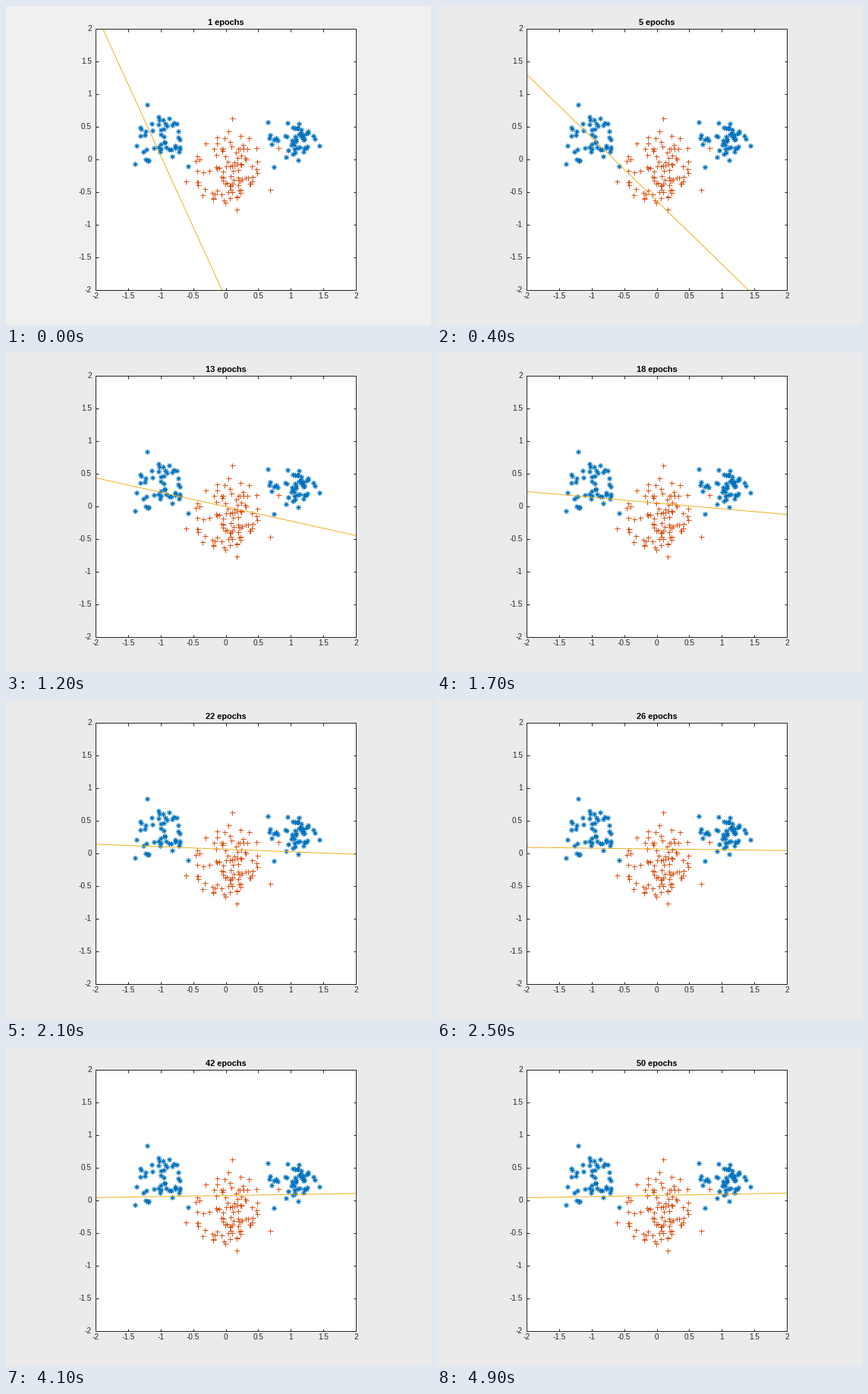
Write a matplotlib script that moves like this. It is 560x420 px and loops after 5000 ms.

```python
import matplotlib.pyplot as plt
import numpy as np
from matplotlib.animation import FuncAnimation

W, H, DPI = 560, 420, 100
PX = 72 / DPI  # points per pixel
LEFT, TOP, WIDE, HIGH = 118, 30, 343, 344
EPOCHS = 50
INK = "#262626"

plt.rcParams["font.family"] = "Liberation Sans"
rng = np.random.default_rng(12)


def cloud(count, cx, cy, rx, ry, tilt=0):
    """Random points in an ellipse, a little denser towards its centre."""
    angle = rng.uniform(0, 2 * np.pi, count)
    radius = rng.uniform(0, 1, count) ** 0.6
    dx = rx * radius * np.cos(angle)
    dy = ry * radius * np.sin(angle)
    return np.column_stack([cx + dx, cy + dy + tilt * dx])


# Each class is its clouds plus a few stragglers.
blue = np.vstack([cloud(47, -1.02, .30, .37, .38),
                  cloud(47, 1.03, .30, .36, .32),
                  [(-1.21, .84), (-.58, -.10), (-1.39, -.07),
                   (.65, .57), (.74, -.12), (1.44, .21)]])
orange = np.vstack([cloud(95, 0, -.12, .53, .55, tilt=.25),
                    [(.10, .63), (.81, .17), (.68, -.46),
                     (.17, -.77), (-.61, -.34)]])


def left_end(step):
    return 0.04 + 2.203 * np.exp(-0.137 * step * (1 + 0.0034 * step))


def right_end(step):
    return 0.117 - 6.61 * np.exp(-0.236 * step / (1 + 0.0124 * step))


fig = plt.figure(figsize=(W / DPI, H / DPI), dpi=DPI)
ax = fig.add_axes([LEFT / W, 1 - (TOP + HIGH) / H, WIDE / W, HIGH / H])
ax.set(xlim=(-2, 2), ylim=(-2, 2))
ticks = np.arange(-2, 2.1, 0.5)
ax.set_xticks(ticks)
ax.set_yticks(ticks)
ax.tick_params(direction="in", length=3.5 * PX, width=PX, color=INK,
               top=True, right=True, labelbottom=False, labelleft=False)
for spine in ax.spines.values():
    spine.set(linewidth=PX, color=INK)


def label(x, y, text, align, size=10, **style):
    return fig.text(x / W, 1 - y / H, text, ha=align, va="baseline",
                    fontsize=size * PX, **style)


for tick in ticks:
    part = (tick + 2) / 4
    label(LEFT + part * WIDE, 385, f"{tick:g}", "center", color=INK)
    label(113, TOP + (1 - part) * HIGH + 3, f"{tick:g}", "right", color=INK)
title = label(290, 25, "", "center", 11, weight="bold", color="black")

ax.plot(*blue.T, ls="", marker=(8, 2, 0), ms=7 * PX, mew=0.75 * PX,
        color="#0072BD")
ax.plot(*orange.T, ls="", marker="+", ms=7 * PX, mew=PX, color="#D95319")
boundary, = ax.plot([], [], lw=PX, color="#EDB120")


def update(frame):
    fig.set_facecolor("#F0F0F0" if frame == 0 else "#EBEBEB")
    title.set_text(f"{frame + 1} epochs")
    boundary.set_data([-2, 2], [left_end(frame), right_end(frame)])
    return title, boundary


anim = FuncAnimation(fig, update, frames=EPOCHS, interval=100,
                     repeat=True, repeat_delay=0, blit=False)
plt.show()
```
